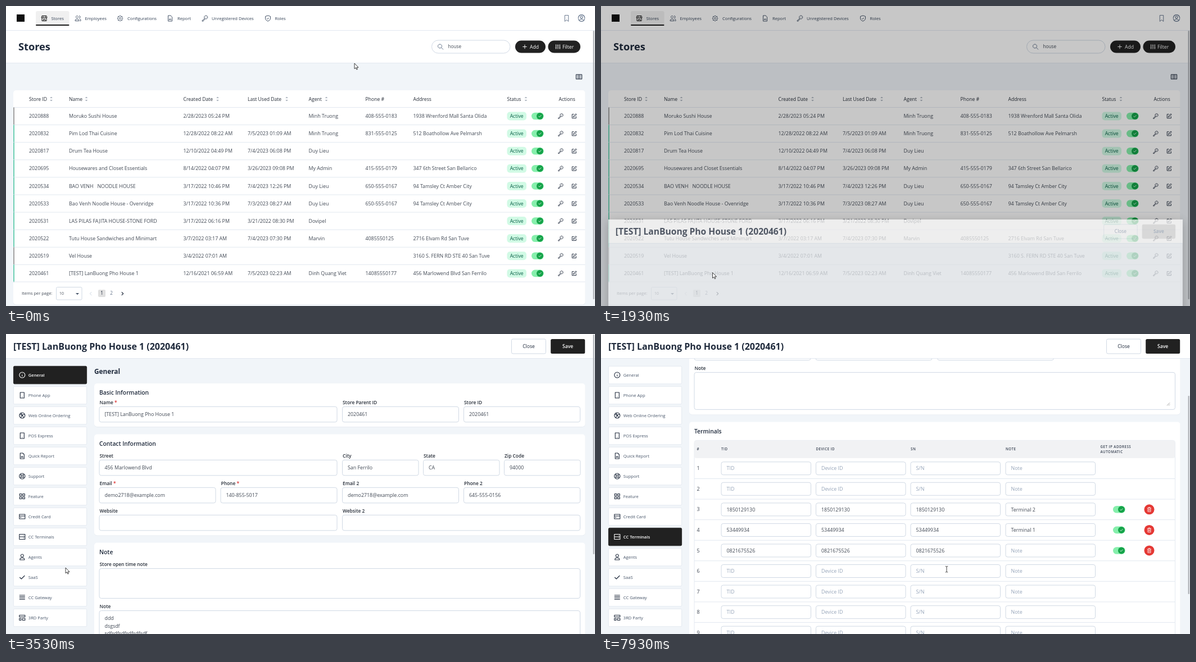
An HTML page that plays this animation: 1048x534 px, repeating every 8 s.

```html
<!DOCTYPE html>
<html lang="en">
<head>
<meta charset="utf-8">
<title>Store admin</title>
<style>
  html, body { margin: 0; width: 100%; height: 100%; overflow: hidden; background: #f1f5f9; }
  svg { display: block; width: 1048px; height: 534px; }
  text { font-family: "Open Sans", "Noto Sans", sans-serif; white-space: pre; }
  .shadow { filter: blur(9px); }
  .item rect { fill: #fff; stroke: #e2e8f0; }
  .item text { fill: #475569; font-weight: 500; }
  .item path { stroke: #1e293b; }
  .item.hover rect { fill: #e2e8f0; }
  .item.on rect { fill: #212121; stroke: #212121; }
  .item.on text { fill: #fff; font-weight: 600; }
  .item.on path { stroke: #fff; }
</style>
</head>
<body>
<svg id="stage" viewBox="0 0 1048 534"></svg>
<script>
const INK = '#1e293b', BODY = '#404854', MUTED = '#94a3b8', LINE = '#e2e8f0', EDGE = '#cbd5e1', DARK = '#212121';
const LOOP = 8000, TICK = 1000 / 15;
const STORE = '[TEST] LanBuong Pho House 1';

const ring = (cx, cy, r) => `M${cx} ${cy - r}a${r} ${r} 0 1 0 .01 0z`;
const ICON = {
  store: 'M4 3h16l2 7H2zM4 10v11h16V10M9 21v-6h6v6M8 3v7M16 3v7',
  people: ring(9, 7, 4) + 'M2 21v-2a5 5 0 0 1 5-4h4a5 5 0 0 1 5 4v2zM16 3a4 4 0 0 1 0 8M18 14a5 5 0 0 1 4 5v2h-3',
  gear: ring(12, 12, 3.5) + 'M12 2l3 3h4v4l3 3-3 3v4h-4l-3 3-3-3H5v-4l-3-3 3-3V5h4z',
  doc: 'M5 2h9l5 5v15H5zM9 18v-4M12 18v-6M15 18v-3',
  key: ring(15.5, 8, 6) + 'M11 12l-9 8v2h4l1-2 5-6M15 8h2',
  shield: 'M12 2l9 3v7c0 5-4 8-9 10c-5-2-9-5-9-10V5zM8 12l3 3 5-5',
  bookmark: 'M6 2h12v20l-6-5-6 5z',
  user: ring(12, 12, 10) + ring(12, 9.5, 3.5) + 'M5 19q7-8 14 0',
  search: ring(10, 10, 7) + 'M15 15l7 7',
  edit: 'M11 4H3v17h17v-8M8 16l1-4L19 2l3 3-10 10z',
  columns: 'M2 4h20v16H2zM9 4v16M15 4v16',
  plus: 'M12 3v18M3 12h18',
  sliders: 'M4 2v12M4 18v4M12 2v4M12 10v12M20 2v12M20 18v4M1 16h6M9 8h6M17 16h6',
  info: ring(12, 12, 10) + 'M12 11v6M12 7v1',
  phone: 'M5 2h14v20H5zM11 18h2',
  globe: ring(12, 12, 10) + 'M3 8l9 3 9-4M12 11l-5 9M12 11l6 9M8 3l4 8',
  support: ring(12, 12, 10) + ring(12, 12, 4) + 'M5 5l4 4M19 5l-4 4M5 19l4-4M19 19l-4-4',
  grid: 'M3 3h7v7H3zM14 3h7v7h-7zM3 14h7v7H3zM14 14h7v7h-7z',
  card: 'M2 4h20v16H2zM2 10h20M5 15h4',
  terminal: 'M2 3h20v18H2zM2 12h20M16 8h2M16 16h2',
  agent: ring(12, 7, 5) + 'M4 22v-2a6 6 0 0 1 6-5h4a6 6 0 0 1 6 5v2z',
  check: 'M3 12l6 6L21 6',
  lines: 'M2 4h20M2 9h20M2 14h20M2 19h20',
  party: 'M2 3h20v6H2zM2 14h6v7H2zM13 14h9v7h-9z',
  trash: 'M4 6h16M6 6v15h12V6M9 6V3h6v3M10 10v7M14 10v7',
  left: 'M15 5l-7 7 7 7',
  right: 'M9 5l7 7-7 7'
};

// All text is placed by its vertical centre.
const text = (x, cy, s, size = 8.85, fill = BODY, weight = 400, more = '') =>
  `<text x="${x}" y="${cy + size * .36}" font-size="${size}" fill="${fill}" font-weight="${weight}" ${more}>${s}</text>`;
const rect = (x, y, w, h, fill, r = 0, stroke = 'none', more = '') =>
  `<rect x="${x}" y="${y}" width="${w}" height="${h}" rx="${r}" fill="${fill}" stroke="${stroke}" stroke-width=".9" ${more}/>`;
const icon = (name, cx, cy, size, color = INK, width = 2) =>
  `<path d="${ICON[name]}" transform="translate(${cx - size / 2} ${cy - size / 2}) scale(${size / 24})" fill="none" stroke="${color}" stroke-width="${width}" stroke-linejoin="round"/>`;
const hline = (x, y, w, color = LINE) => rect(x, y - .5, w, 1, color);
const tri = (cx, cy, w, h, color) => `<path d="M${cx - w} ${cy}h${2 * w}l${-w} ${h}z" fill="${color}"/>`;
const card = (y, h) => rect(157, y + .8, 873.5, h, '#e4e9f0', 5) + rect(157, y, 873.5, h, '#fff', 5);
const toggle = (x, cy) => rect(x, cy - 6.3, 21.7, 12.6, '#86efac', 6.3) +
  `<circle cx="${x + 15}" cy="${cy}" r="6" fill="#16a34a"/>` + icon('check', x + 15, cy, 6.5, '#fff', 3);
const middle = 'text-anchor="middle"';

/* ---------- store list ---------- */
const NAV = [['store', 68, 80.5, 'Stores'], ['people', 128, 140.5, 'Employees'], ['gear', 203, 216, 'Configurations'],
  ['doc', 292, 305, 'Report'], ['key', 354, 366, 'Unregistered Devices'], ['shield', 466, 478.5, 'Roles']];
const HEADS = [[41, 'Store ID', 80.5], [112, 'Name', 143], [315.5, 'Created Date', 376.5], [430, 'Last Used Date', 499.5],
  [538.5, 'Agent', 570], [639.5, 'Phone #'], [724.5, 'Address'], [891.5, 'Status', 925], [983.5, 'Actions']];
const STORES = `2020888|Moruko Sushi House|2/28/2023 05:24 PM||Minh Truong|408-555-0183|1938 Wrenford Mall Santa Olida
2020832|Pim Lod Thai Cuisine|12/28/2022 08:22 AM|7/5/2023 01:09 AM|Minh Truong|831-555-0125|512 Boathollow Ave Pelmarsh
2020817|Drum Tea House|12/10/2022 04:49 PM|7/4/2023 06:08 PM|Duy Lieu||
2020695|Housewares and Closet Essentials|8/14/2022 04:07 PM|3/26/2023 09:08 PM|My Admin|415-555-0179|347 6th Street San Bellarico
2020534|BAO VENH   NOODLE HOUSE|3/17/2022 10:46 PM|7/4/2023 12:26 PM|Duy Lieu|650-555-0167|94 Tamsley Ct Amber City
2020533|Bao Venh Noodle House - Ovenridge|3/17/2022 10:36 PM|7/3/2023 08:27 AM|Duy Lieu|650-555-0167|94 Tamsley Ct Amber City
2020531|LAS PILAS FAJITA HOUSE-STONE FORD|3/17/2022 06:16 PM|3/21/2022 08:30 PM|Dovipel||
2020522|Tutu House Sandwiches and Minimart|3/7/2022 03:17 AM|7/4/2023 07:30 PM|Marvin|4085550125|2716 Elvam Rd San Tuve
2020519|Vel House|3/4/2022 07:01 AM||||3160 S. FERN RD STE 40 San Tuve
2020461|${STORE}|12/16/2021 06:59 AM|7/5/2023 02:23 AM|Dinh Quang Viet|14085550177|456 Marlowend Blvd San Ferrilo`
  .split('\n').map(row => row.split('|'));

function storeRow(cells, i) {
  const cy = 196 + 31.1 * i, top = cy - 15.5;
  return hline(13, top, 1017.5) + rect(13, top, 2, 31.1, cells[3] ? '#6fd0b5' : '#a3a3a3') +
    cells.map((s, c) => text(HEADS[c][0], cy, s)).join('') +
    rect(891.5, cy - 7.5, 34.5, 15, '#d1fae5', 5) + text(908.7, cy, 'Active', 8.7, '#065f46', 400, middle) +
    toggle(935, cy) + icon('key', 987, cy, 10.5, INK, 2) + icon('edit', 1011, cy, 10, INK, 2.3);
}

function listPage() {
  return rect(0, 0, 1048, 534, '#f1f5f9') + rect(0, 0, 1048, 101.5, '#fff') +
    hline(0, 43.5, 1048) + hline(0, 101.5, 1048) +
    rect(19, 15, 14, 13, '#111') +
    rect(53, 9, 59.5, 26, '#f0f0f0', 3) + rect(53, 33, 59.5, 2, '#1a1a1a', 1) +
    NAV.map(([name, ix, tx, s], i) => icon(name, ix, 22, 12, i ? '#475569' : '#111', 2) + text(tx, 22, s, 7.6, '#334155', 500)).join('') +
    icon('bookmark', 997.5, 22, 13, '#64748b', 1.8) + icon('user', 1024, 21.5, 14, '#64748b', 2) +
    text(22, 72.5, 'Stores', 18.2, INK, 700) +
    rect(757.5, 61, 139.5, 23, '#fff', 11.5, EDGE) + icon('search', 773, 72.5, 12, '#64748b') + text(786.5, 72.5, 'house', 8.2) +
    rect(906, 61.6, 54, 21.8, DARK, 10.9) + icon('plus', 923, 72.5, 10, '#fff', 2.2) + text(932, 72.5, 'Add', 8.6, '#fff', 500) +
    rect(964.5, 61.6, 57.5, 21.8, DARK, 10.9) + icon('sliders', 982, 72.5, 10, '#fff', 2.4) + text(990, 72.5, 'Filter', 8.6, '#fff', 500) +
    icon('columns', 1019.5, 126, 12, INK, 2.4) +
    rect(13, 151, 1017.5, 381.5, '#e4e9f0', 5) + rect(13, 150, 1017.5, 381.5, '#fff', 5) +
    HEADS.map(([x, s, sort]) => text(x, 165.5, s, 8.6, '#262d38', 500) +
      (sort ? tri(sort, 164, 2.3, -2.6, '#a8b0bb') + tri(sort, 167, 2.3, 2.6, '#a8b0bb') : '')).join('') +
    STORES.map(storeRow).join('') + hline(13, 491, 1017.5) +
    text(28, 511.5, 'Items per page:', 7.5) + rect(89.5, 500.5, 45.5, 22.5, '#fff', 2, EDGE) +
    text(95, 512, '10', 6.8) + tri(127, 511, 3, 3, '#475569') +
    icon('left', 151, 512, 10, EDGE, 2.4) + rect(164, 505, 13, 13, '#e0e0e0', 2) +
    text(170.5, 511.5, '1', 8.2, INK, 400, middle) + text(187.5, 511.5, '2', 8.2, '#64748b', 400, middle) +
    icon('right', 207, 512, 10, INK, 2.6) + rect(1044.5, 44, 2.5, 478, '#b5b8bd', 1);
}

/* ---------- store dialog ---------- */
function field(x, y, w, label, value = '', h = 27.5) {
  const req = label.endsWith('*');
  const name = req ? label.slice(0, -1) + '<tspan fill="#dc2626">*</tspan>' : label;
  return text(x + .5, y - 7.2, name, 8.4, '#262d38', 600) + rect(x, y, w, h, '#fff', 3.5, EDGE) +
    text(x + 9.5, y + 13.7, value);
}
const heading = (cy, s) => text(166, cy, s, 10.3, INK, 600);
const grip = y => `<path d="M1007 ${y}l5-5M1010 ${y}l2-2" stroke="#777" stroke-width=".7"/>`;

const W2 = 423, W4 = 207, W6 = 135.5;
function generalPage() {
  return text(157, 66.5, 'General', 11.8, INK, 700) +
    card(88, 77) + heading(104, 'Basic Information') +
    field(166, 129.3, W2, 'Name *', STORE) + field(598.5, 129.3, W4, 'Store Parent ID', '2020461') + field(814.5, 129.3, W4, 'Store ID', '2020461') +
    card(178.5, 180) + heading(195, 'Contact Information') +
    field(166, 224.3, W2, 'Street', '456 Marlowend Blvd') + field(598.5, 224.3, W6, 'City', 'San Ferrilo') +
    field(742.5, 224.3, W6, 'State', 'CA') + field(886.5, 224.3, W6, 'Zip Code', '94000') +
    field(166, 273.3, W4, 'Email *', 'demo2718@example.com') + field(382, 273.3, W4, 'Phone *', '140-855-5017') +
    field(598.5, 273.3, W4, 'Email 2', 'demo2718@example.com') + field(814.5, 273.3, W4, 'Phone 2', '645-555-0156') +
    field(166, 322.3, W2, 'Website') + field(598.5, 322.3, W2, 'Website 2') +
    card(371.5, 200) + heading(388, 'Note') +
    field(166, 417.5, 855.5, 'Store open time note', '', 53) + field(166, 492.5, 855.5, 'Note', 'ddd', 80) +
    text(175.5, 519.5, 'dsgsdf') + text(175.5, 532.7, 'sdfsdfsdfsdfsdfsdf');
}

const COLS = [[214, 'TID', 'TID'], [382.5, 'DEVICE ID', 'Device ID'], [551, 'SN', 'S/N'], [720, 'NOTE', 'Note']];
const TERMINALS = { 3: ['1850129130', 'Terminal 2'], 4: ['53449934', 'Terminal 1'], 5: ['0821675526', ''] };
function terminalRow(n) {
  const cy = 402.8 + 36.56 * (n - 1), data = TERMINALS[n];
  const cells = COLS.map(([x, , hint], c) => {
    const value = data && data[c < 3 ? 0 : 1];
    return rect(x, cy - 11.5, 159.5, 23, '#fff', 3.5, EDGE) + text(x + 9.5, cy, value || hint, 8.9, value ? BODY : MUTED);
  }).join('');
  const tools = data ? toggle(911, cy) + `<circle cx="975.5" cy="${cy}" r="9" fill="#e53935"/>` + icon('trash', 975.5, cy, 10, '#fff', 2) : '';
  return text(170.5, cy, n) + cells + tools + hline(166, cy + 18.3, 855.5);
}
function terminalPage() {
  const head = (x, cy, s) => text(x, cy, s, 6.2, '#374151', 600, 'letter-spacing=".5"');
  return text(157, 66.5, 'CC Terminals', 11.8, INK, 700) +
    card(88, 219) + heading(104, 'Platform Information') +
    field(166, 133.7, W2, 'Platform', 'Brol') + tri(577.3, 146, 3, 3, '#475569') + field(598.5, 133.7, W2, 'Processor Company') +
    field(166, 182.7, W4, 'MID') + field(382, 182.7, W4, 'User Name') + field(598.5, 182.7, W4, 'Password') +
    text(814.5, 194.8, 'BROL Merchant Center', 8.7, '#2f7f73', 400, 'text-decoration="underline"') +
    field(166, 232, 855.5, 'Note', '', 66) + grip(291) +
    card(320, 480) + heading(337, 'Terminals') +
    rect(166, 353, 855.5, 400, '#fff', 4, LINE) + rect(166, 353, 855.5, 31.5, '#f1f2f4', 4) +
    head(170.5, 368.7, '#') + COLS.map(([x, s]) => head(x, 368.7, s)).join('') +
    head(888.5, 364.3, 'GET IP ADDRESS') + head(888.5, 373, 'AUTOMATIC') +
    [1, 2, 3, 4, 5, 6, 7, 8, 9].map(terminalRow).join('');
}

const MENU = [['info', 'General'], ['phone', 'Phone App'], ['globe', 'Web Online Ordering'], ['phone', 'POS Express'],
  ['doc', 'Quick Report'], ['support', 'Support'], ['grid', 'Feature'], ['card', 'Credit Card'], ['terminal', 'CC Terminals'],
  ['agent', 'Agents'], ['check', 'SaaS'], ['lines', 'CC Gateway'], ['party', '3RD Party']];
const itemTop = i => 57.3 + 36 * i;
const menu = MENU.map(([name, s], i) => `<g class="item">${rect(13.4, itemTop(i), 130.2, 31.5, '#fff', 2)}` +
  icon(name, 28.8, itemTop(i) + 15.7, 12, INK, 2.2) + text(39.8, itemTop(i) + 15.7, s, 7.6) + '</g>').join('');

const buttons = (x, ready) => rect(x, 9, 61, 26, '#fff', 2.5, ready ? EDGE : LINE) +
  text(x + 30.5, 22, 'Close', 8.6, ready ? INK : MUTED, 500, middle) +
  rect(x + 69.7, 9, 61, 26, ready ? DARK : '#e0e0e0', 2.5) +
  text(x + 100.2, 22, 'Save', 8.6, ready ? '#fff' : MUTED, 600, middle);

const polar = deg => [16 * Math.cos(deg * Math.PI / 180), 16 * Math.sin(deg * Math.PI / 180)];
const dialog = `<g id="dialog">${rect(0, 3, 1048, 534, '#000', 0, 'none', 'class="shadow" opacity=".3"')}
  ${rect(0, 0, 1048, 534, '#f1f5f9')}
  <g id="general">${generalPage()}</g>
  <g id="terminals">${terminalPage()}</g>
  <g id="menu">${menu}</g>
  ${rect(0, 0, 1048, 43.5, '#fff')}${hline(0, 43.5, 1048)}
  ${text(13, 22, STORE + ' (2020461)', 16, INK, 700)}
  <g id="loading">${buttons(904.2, false)}
    <path id="spinner" d="M${polar(-32)}A16 16 0 1 1 ${polar(155)}" fill="none" stroke="${DARK}" stroke-width="1.4"/>
    ${text(524, 310, 'Loading...', 8.65, MUTED, 400, middle)}</g>
  <g id="ready">${buttons(899.5, true)}${rect(1044.5, 1, 2.5, 391, '#b5b8bd', 1, 'none', 'id="thumb"')}</g></g>`;

const cursors = `<g id="cursor" fill="#fff" stroke="#111" stroke-width=".8" stroke-linejoin="round">
  <path d="M0 0v9.8l2.3-2 1.6 3.4 1.5-.7-1.5-3.2h3.1z"/>
  <path d="M-1 1.2a1.1 1.1 0 0 1 2.2 0V5l4 .8q1 .3 1 1.3l-.7 3.4-.8 2.3H0L-3 8.5q-.2-1.2 1-1l1 .8z"/>
  <path d="M-2.2-5Q0-5 0-4Q0-5 2.2-5M0-4V4.6M-2.2 5.5Q0 5.5 0 4.6Q0 5.5 2.2 5.5" fill="none"/></g>`;

document.getElementById('stage').innerHTML =
  listPage() + rect(0, 0, 1048, 534, '#000', 0, 'none', 'id="shade"') + dialog + cursors;

/* ---------- motion, in ticks of 1/15 s ---------- */
const PATH = [[0, 620, 102], [4, 505, 205], [8, 290, 390], [11, 203, 454], [14, 203, 454], [17, 198.5, 474.5], [52, 198.5, 474.5],
  [53, 106, 416], [54, 106, 416], [56, 96, 400], [62, 96, 400], [68, 79, 470], [71, 79, 470], [72, 77.5, 471], [74, 77.5, 471],
  [80, 80, 405], [86, 84, 362], [89, 84, 362], [90, 160.5, 365], [92, 250, 359], [94, 250, 359], [98, 310, 359], [99, 310, 359],
  [100, 409, 379], [106, 409, 379], [107, 643, 432], [118, 643, 432], [119, 615, 418.5]];
// tick, top, scale, opacity, shade
const OPEN = [[26, 530, .935, .05, .05], [27, 508, .945, .2, .1], [28, 473, .954, .4, .15], [29, 380, .975, .7, .22],
  [30, 200, .99, .9, .28], [31, 76, 1, 1, .32], [32, 34, 1, 1, .32], [33, 14, 1, 1, .32], [34, 5, 1, 1, .32], [35, 0, 1, 1, .32]];
const LOADED = 36, SWITCHED = 90, SCROLLED = 107, TYPING = 119, SCROLL = 163.6;

function sample(keys, t) {
  const i = keys.findIndex(k => k[0] > t);
  if (i < 0) return keys[keys.length - 1].slice(1);
  const a = keys[Math.max(0, i - 1)], b = keys[i];
  const u = Math.max(0, (t - a[0]) / (b[0] - a[0]));
  return a.slice(1).map((v, k) => v + (b[k + 1] - v) * u);
}

const el = id => document.getElementById(id);
const show = (node, on) => { node.style.display = on ? '' : 'none'; };
const items = [...el('menu').children], pointers = [...el('cursor').children];

function draw(tick) {
  const [x, y] = sample(PATH, tick);
  const [top, scale, alpha, shade] = sample(OPEN, tick);
  const opening = tick >= OPEN[0][0], loaded = tick >= LOADED;
  const switched = tick >= SWITCHED, scrolled = tick >= SCROLLED;

  show(el('dialog'), opening);
  el('dialog').setAttribute('transform', `translate(${524 * (1 - scale)} ${top}) scale(${scale})`);
  el('dialog').setAttribute('opacity', alpha);
  el('shade').setAttribute('opacity', opening ? shade : 0);
  show(el('loading'), !loaded);
  show(el('ready'), loaded);
  show(el('menu'), loaded);
  show(el('general'), loaded && !switched);
  show(el('terminals'), switched);
  el('spinner').setAttribute('transform', `translate(524 278) rotate(${(tick - 31) * 36})`);
  el('terminals').setAttribute('transform', `translate(0 ${scrolled ? -SCROLL : 0})`);
  el('thumb').setAttribute('y', scrolled ? 110 : 1);
  el('thumb').setAttribute('height', switched ? 353 : 391);

  const selected = switched ? 8 : 0;
  const over = loaded && x > 13 && x < 144 ? items.findIndex((_, i) => y >= itemTop(i) && y <= itemTop(i) + 31.5) : -1;
  items.forEach((g, i) => g.setAttribute('class', 'item' + (i === selected ? ' on' : i === over ? ' hover' : '')));
  const kind = tick >= TYPING ? 2 : over >= 0 ? 1 : 0;
  pointers.forEach((p, i) => show(p, i === kind));
  el('cursor').setAttribute('transform', `translate(${x} ${y})`);
}

const start = performance.now();
function frame(now) {
  const t = Math.max(0, now - start) % LOOP;
  draw(Math.floor((t + 4) / TICK) % 120);
  requestAnimationFrame(frame);
}
draw(0);
requestAnimationFrame(frame);
</script>
</body>
</html>
```
